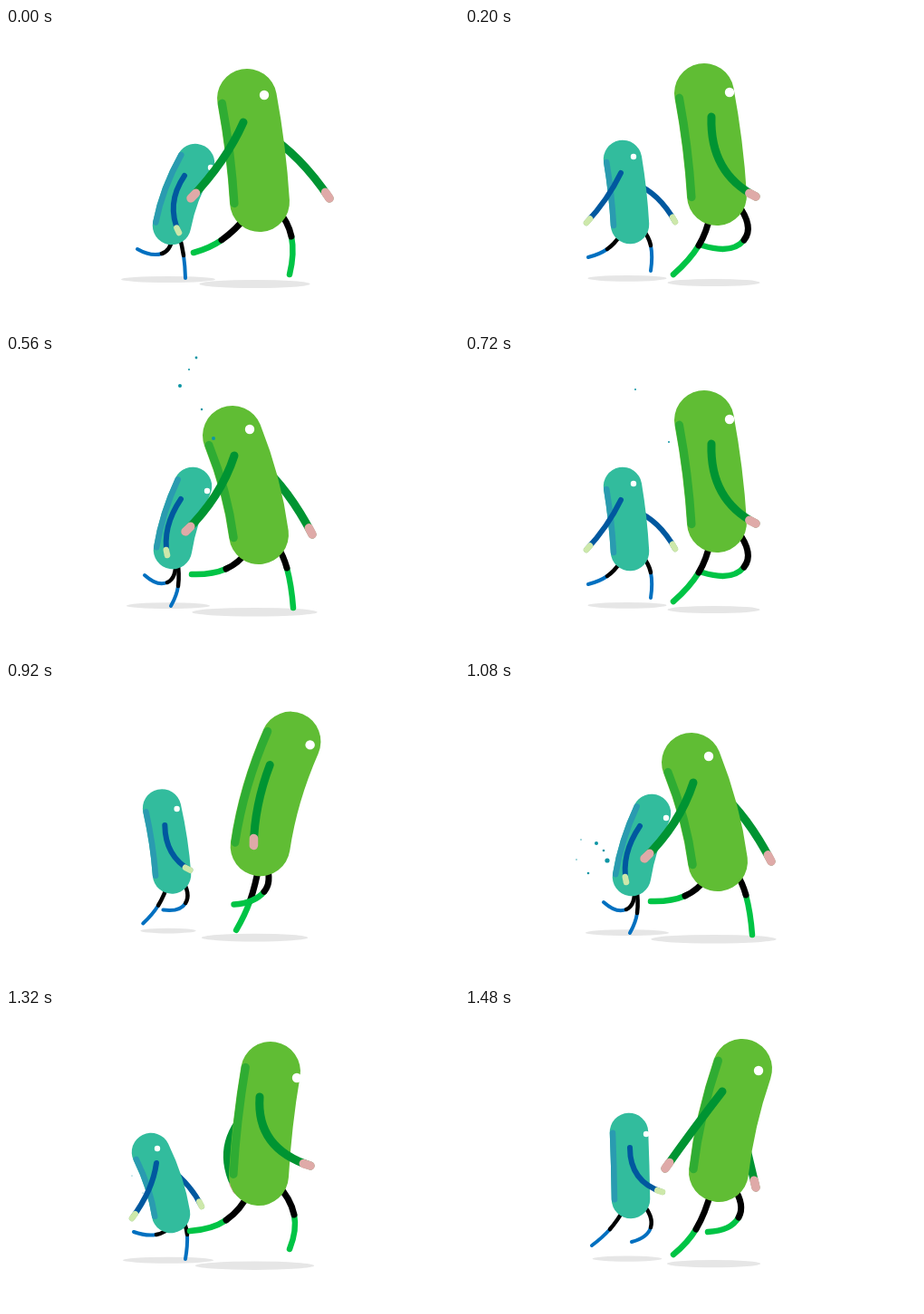
Animation, 500 px wide and 330 px high, one loop 1.52 s. Source, as an HTML page with a canvas:

```html
<!DOCTYPE html>
<html>
<head>
<meta charset="utf-8">
<style>
html, body { margin: 0; width: 500px; height: 330px; overflow: hidden; background: #fff; }
canvas { display: block; }
</style>
</head>
<body>
<canvas id="stage" width="500" height="330"></canvas>
<script>
const ctx = document.getElementById('stage').getContext('2d');
const LOOP = 1520, STEP = 40, CYCLE = 520;

// Pose rows: phase, head, base, eye, near arm (shoulder, bend, tip), far arm (same)
// Leg rows: phase, hip, knee, foot; the far leg runs half a cycle ahead
const big = {
  width: 66, stripe: 9, inset: 28, eye: 5.2, arm: 9, hand: 8, leg: 7,
  skin: '#60bd34', shade: '#2fac33', sleeve: '#009432', palm: '#dfaaa8', shin: '#00c445',
  shadow: { x: 274.5, y: 282.5, rx: 61, ry: 4.5, swell: 10, peak: 65 },
  pose: [
    [0, 266,78, 280,192, 285,74, 262,104, 243,147, 204,188, 285,115, 325,140, 357,188],
    [40, 250,89, 279,198, 269,82, 252,111, 237,157, 198,195, 280,120, 312,148, 338,198],
    [120, 243,85, 279,194, 261,78, 246,110, 248,155, 254,207, 268,112, 285,155, 295,200],
    [200, 264,72, 278,185, 292,71, 272,98, 270,160, 321,186, 270,105, 262,150, 270,190],
    [280, 292,69, 279,184, 321,76, 280,97, 276,154, 336,173, 270,110, 228,150, 255,200],
    [360, 315,67, 281,184, 340,72, 294,94, 292,145, 325,185, 295,105, 272,155, 284,195],
    [440, 306,66, 280,180, 324,68, 284,91, 253,131, 221,176, 300,110, 310,150, 321,197]
  ],
  legs: [
    [0, 298,198, 315,230, 313,272],
    [20, 298,192, 318,227, 313,265],
    [40, 298,208, 310,235, 317,279],
    [180, 272,200, 255,243, 230,271],
    [200, 271,205, 258,240, 230,272],
    [260, 268,205, 238,234, 207,248],
    [280, 270,200, 243,233, 203,245],
    [300, 268,215, 243,236, 205,242],
    [440, 296,196, 302,230, 268,246],
    [460, 300,193, 308,234, 262,240]
  ]
};

const small = {
  width: 42.5, stripe: 6.5, inset: 18, eye: 3.2, arm: 6, hand: 6, leg: 4.5,
  skin: '#32bc9d', shade: '#2a9bb0', sleeve: '#00589f', palm: '#cde8aa', shin: '#0070c0',
  shadow: { x: 179, y: 276, rx: 41, ry: 3.2, swell: 11, peak: -5 },
  pose: [
    [0, 209,149, 183,218, 226,154, 197,163, 176,194, 191,226, 200,170, 198,195, 190,215],
    [40, 206,145, 184,215, 222,150, 193,159, 172,190, 178,221, 198,165, 190,190, 190,210],
    [120, 193,138, 183,212, 208,139, 184,158, 170,190, 152,222, 192,160, 210,175, 215,205],
    [200, 174,145, 182,217, 186,142, 172,160, 158,189, 134,215, 188,172, 214,182, 232,214],
    [280, 160,158, 182,226, 167,154, 166,170, 162,200, 139,231, 180,175, 205,195, 216,218],
    [360, 166,146, 183,217, 179,145, 170,165, 168,195, 180,218, 176,165, 190,185, 196,210],
    [440, 181,136, 183,210, 200,138, 182,153, 182,191, 218,202, 184,160, 180,180, 180,205]
  ],
  legs: [
    [0, 184,232, 172,249, 145,244],
    [20, 185,238, 166,249, 141,246],
    [40, 187,228, 178,251, 153,243],
    [180, 196,215, 205,241, 184,257],
    [200, 196,222, 205,240, 205,268],
    [260, 191,228, 196,251, 198,276],
    [280, 196,235, 200,249, 198,276],
    [300, 189,226, 190,255, 182,277],
    [440, 176,220, 160,243, 140,261],
    [460, 172,228, 157,244, 136,253]
  ]
};

const bursts = [
  { born: 480, from: [205, 125], drops: [[192,34,2], [229,92,2], [210,3,1.4], [202,16,1], [216,60,1.2]] },
  { born: 1000, from: [172, 196], drops: [[145,178,2], [157,197,2.6], [153,186,1.3], [136,211,1.3], [123,196,.7], [128,174,.7]] }
];

// Smooth periodic interpolation; returns a list of [x, y] points
function sample(rows, phase) {
  const n = rows.length;
  const p = ((phase % CYCLE) + CYCLE) % CYCLE;
  let i = n - 1;
  while (rows[i][0] > p) i--;
  const row = k => rows[(k + n) % n];
  const time = k => row(k)[0] + Math.floor(k / n) * CYCLE;
  const span = time(i + 1) - time(i), u = (p - time(i)) / span;
  const slope = (k, j) => (row(k + 1)[j] - row(k - 1)[j]) / (time(k + 1) - time(k - 1)) * span;
  const points = [];
  for (let j = 1; j < row(i).length; j++) {
    const a = row(i)[j], b = row(i + 1)[j], d = slope(i, j), e = slope(i + 1, j);
    const v = a + u * (d + u * (3 * (b - a) - 2 * d - e + u * (2 * (a - b) + d + e)));
    if (j % 2) points.push([v]); else points[points.length - 1].push(v);
  }
  return points;
}

const add = (a, b, k = 1) => [a[0] + b[0] * k, a[1] + b[1] * k];
const gap = (a, b) => Math.hypot(b[0] - a[0], b[1] - a[1]);
const unit = (a, b) => {
  const d = gap(a, b) || 1;
  return [(b[0] - a[0]) / d, (b[1] - a[1]) / d];
};

function curve(a, c, b, width, color) {
  ctx.lineWidth = width;
  ctx.strokeStyle = color;
  ctx.beginPath();
  ctx.moveTo(...a);
  ctx.quadraticCurveTo(...c, ...b);
  ctx.stroke();
}

function oval(x, y, rx, ry, color) {
  ctx.fillStyle = color;
  ctx.beginPath();
  ctx.ellipse(x, y, rx, ry, 0, 0, 2 * Math.PI);
  ctx.fill();
}

function drawShadow({ x, y, rx, ry, swell, peak }, phase) {
  const wave = Math.cos(4 * Math.PI * (phase - peak) / CYCLE);
  oval(x, y + 1.5 * wave, rx + swell * wave, ry + .4 * wave, '#e6e6e6');
}

function drawLeg(who, phase) {
  const [hip, knee, foot] = sample(who.legs, phase);
  const flow = unit(hip, foot);
  curve(knee, add(knee, flow, .45 * gap(knee, foot)), foot, who.leg - .5, who.shin);
  curve(hip, add(knee, flow, -.45 * gap(hip, knee)), knee, who.leg, '#000');
}

function drawArm(who, shoulder, bend, tip) {
  const wrist = add(tip, unit(bend, tip), -who.hand);
  curve(shoulder, bend, tip, who.arm, who.sleeve);
  curve(wrist, wrist, tip, who.arm + .6, who.palm);
}

function drawWalker(who, phase) {
  const [head, base, eye, ...arms] = sample(who.pose, phase);
  const waist = [base[0] + .25 * (head[0] - base[0]), (head[1] + base[1]) / 2];
  const side = (a, b) => {
    const [x, y] = unit(a, b);
    return [-y * who.inset, x * who.inset];
  };
  drawArm(who, ...arms.slice(3));
  drawLeg(who, phase + CYCLE / 2);
  drawLeg(who, phase);
  curve(head, waist, base, who.width, who.skin);
  curve(add(head, side(head, waist)), add(waist, side(head, base)),
    add(base, side(waist, base)), who.stripe, who.shade);
  oval(...eye, who.eye, who.eye, '#fff');
  drawArm(who, ...arms.slice(0, 3));
}

function drawDrops({ born, from, drops }, t) {
  const age = t - born;
  if (age <= 0 || age > 330) return;
  const out = Math.min(1, age / 80), drift = Math.max(0, (age - 80) / 240);
  for (const [x, y, size] of drops) {
    const r = size * (1 - drift) - .5 * drift + .4 * (size > 1.9) * drift * 2.5;
    if (r > .2) {
      oval(from[0] + (x - from[0]) * out - 6 * drift,
        from[1] + (y - from[1]) * out + 6 * drift, r, r, '#0c95a4');
    }
  }
}

function draw() {
  const t = Math.floor(performance.now() % LOOP / STEP) * STEP;
  const phase = t % CYCLE;
  ctx.fillStyle = '#fff';
  ctx.fillRect(0, 0, 500, 330);
  ctx.lineCap = 'round';
  drawShadow(small.shadow, phase);
  drawShadow(big.shadow, phase);
  drawWalker(small, phase);
  drawWalker(big, phase);
  bursts.forEach(b => drawDrops(b, t));
  requestAnimationFrame(draw);
}
draw();
</script>
</body>
</html>
```
